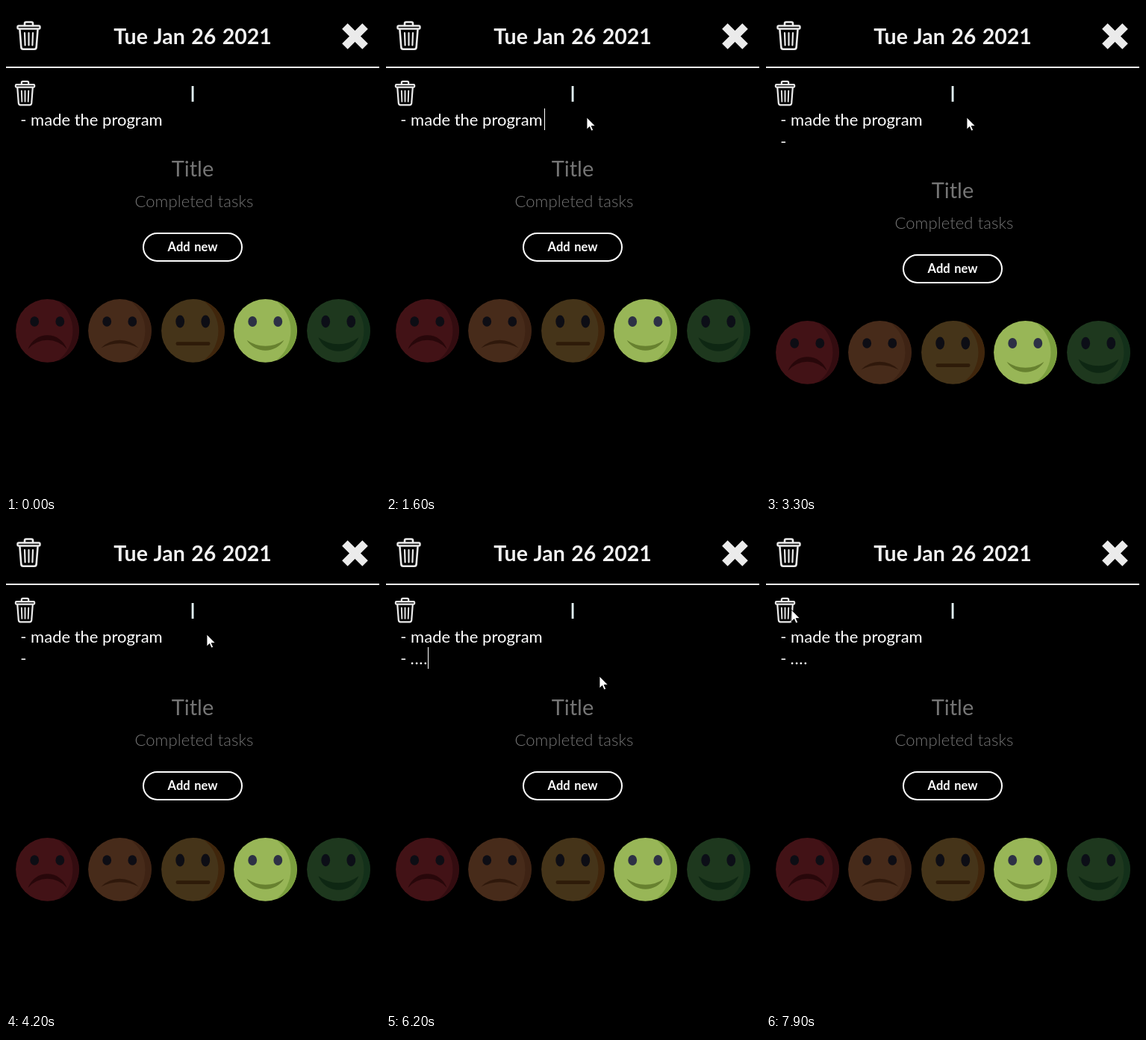
An HTML page for the animation above (8000 ms loop, 501 by 654 pixels).

```html
<!DOCTYPE html>
<html lang="en">
<head>
<meta charset="utf-8">
<title>Daily log</title>
<style>
  html, body { margin: 0; width: 100%; height: 100%; overflow: hidden; background: #000; }
  svg { display: block; width: 501px; height: 654px; }
  text { font-family: Lato, Roboto, sans-serif; fill: #fff; white-space: pre; }
  .mid { text-anchor: middle; }
  .head { font-size: 28.5px; font-weight: 700; word-spacing: 1.5px; fill: #f2f2f2; }
  .title { font-size: 29px; }
  .body { font-size: 22px; }
  .dots { letter-spacing: .7px; }
  .button { font-size: 16.5px; font-weight: 700; word-spacing: 1.5px; }
  .hint { fill: #757575; }
  .thin { font-weight: 300; letter-spacing: .1px; }
</style>
</head>
<body>
<svg viewBox="0 0 501 654">
  <defs>
    <g id="bin" fill="none" stroke="#ebebeb" stroke-width="2.6" stroke-linecap="round" stroke-linejoin="round">
      <path d="M11 6V3.5Q11 1.5 13 1.5H20Q22 1.5 22 3.5V6"/>
      <rect x="1.5" y="6.5" width="30" height="4" rx="1.5" stroke-width="2.4"/>
      <path d="M4.5 12L6.3 35Q6.6 37.7 9 37.7H24Q26.4 37.7 26.7 35L28.5 12"/>
      <path d="M11 16L11.6 32.5M16.5 16V32.5M22 16L21.4 32.5" stroke-width="2.2"/>
    </g>
  </defs>
  <rect width="501" height="654"/>
  <use href="#bin" x="14" y="20"/>
  <text class="head mid" x="250" y="50.5">Tue Jan 26 2021</text>
  <path d="M453.9 26.9L481.1 54.1M481.1 26.9L453.9 54.1" stroke="#ebebeb" stroke-width="10.6"/>
  <rect y="81" width="500" height="2" fill="#f0f0f0"/>

  <use href="#bin" transform="translate(11.5 99.5) scale(.85 .87)"/>
  <text class="title mid" x="250" y="128" style="fill:#e4fbff">I</text>
  <text class="body" x="19.3" y="160">- made the program</text>
  <text class="body" x="19.3" y="189" id="dash"></text>
  <text class="body dots" x="32.5" y="189" id="dots"></text>
  <rect id="caret" width="1" height="29" fill="#fff"/>

  <g id="form">
    <text class="title mid hint" x="250" y="228">Title</text>
    <text class="body thin mid hint" x="252" y="269">Completed tasks</text>
    <rect x="184" y="304" width="132" height="37" rx="18.5" fill="none" stroke="#fff" stroke-width="2"/>
    <text class="button mid" x="250" y="328">Add new</text>
    <g id="faces"></g>
  </g>
  <path id="pointer" d="M0 0V16L3.7 12.5 6.1 18 8.6 17 6.2 11.5H11.3Z" fill="#fff" stroke="#000" stroke-width=".8"/>
</svg>
<script>
const LOOP = 8000, TICK = 100;
const el = id => document.getElementById(id);

// crescent mouth between two arcs that share their ends
function bow(half, end, outer, inner) {
  const radius = peak => (half * half + (peak - end) ** 2) / (2 * Math.abs(peak - end));
  const sweep = outer < end ? 1 : 0;
  return `M${-half} ${end}A${radius(outer)} ${radius(outer)} 0 0 ${sweep} ${half} ${end}` +
    `A${radius(inner)} ${radius(inner)} 0 0 ${1 - sweep} ${-half} ${end}Z`;
}

const faces = [
  { x: 55.5, skin: '#421216', shade: '#330c10', eye: '#0d0d14', mouth: '#28070a', ry: 6.7, lips: bow(26, 24.5, 6, 12.5) },
  { x: 152.5, skin: '#472b1a', shade: '#3e2314', eye: '#0d0d14', mouth: '#2f180b', ry: 6.7, lips: bow(25, 23, 12.5, 17) },
  { x: 250.5, skin: '#453419', shade: '#40260c', eye: '#0d0d14', mouth: '#2e1b09', ry: 8.5,
    lips: 'M-21 15H21Q23 15 23 17.3T21 19.6H-21Q-23 19.6 -23 17.3T-21 15Z' },
  { x: 347.5, skin: '#98b657', shade: '#7b9f3e', eye: '#2d3045', mouth: '#67812f', ry: 7, lips: bow(25, 12.5, 26.5, 20.5) },
  { x: 445.5, skin: '#1e381e', shade: '#13301a', eye: '#0c0e17', mouth: '#0e2713', ry: 8.2, lips: bow(27, 9, 27.5, 18) }
];

el('faces').innerHTML = faces.map(f => `
  <g transform="translate(${f.x} 434.3)">
    <circle r="42.4" fill="${f.skin}"/>
    <path d="M14 -40A42.4 42.4 0 0 1 14 40A50 50 0 0 0 14 -40Z" fill="${f.shade}"/>
    <ellipse cx="-17.3" cy="-12.3" rx="5.9" ry="${f.ry}" fill="${f.eye}"/>
    <ellipse cx="16.8" cy="-12.3" rx="5.9" ry="${f.ry}" fill="${f.eye}"/>
    <path d="${f.lips}" fill="${f.mouth}"/>
  </g>`).join('');

// time, x, y of the pointer tip
const route = [
  [400, 451, 330], [1200, 279, 139], [1300, 273, 143], [1400, 269, 149],
  [5800, 269, 149], [6200, 286, 205], [6800, 286, 205], [7100, 231, 254],
  [7300, 190, 215], [7500, 190, 215], [7900, 34, 116]
];
// time spans in which the caret is visible
const blinks = [[1600, 2600], [2700, 3300], [3800, 4200], [4700, 5700], [6000, 6500]];
const dotTimes = [4800, 4900, 5100, 5200];

function pointerAt(t) {
  const next = route.findIndex(p => p[0] > t);
  if (next < 0) return route[route.length - 1].slice(1);
  const a = route[Math.max(0, next - 1)], b = route[next];
  const k = Math.max(0, (t - a[0]) / (b[0] - a[0]));
  const ease = k * (2 - k);
  return [1, 2].map(i => Math.round(a[i] + (b[i] - a[i]) * ease));
}

function draw(time) {
  const t = Math.floor((time % LOOP) / TICK) * TICK;
  const secondLine = t >= 2100;
  const dots = dotTimes.filter(d => t >= d).length;

  el('form').setAttribute('transform', `translate(0 ${secondLine ? 29 : 0})`);
  el('dash').textContent = t >= 2700 ? '-' : '';
  el('dots').textContent = '.'.repeat(dots);

  const caretX = !secondLine ? 212 : t < 2700 ? 20 : t < 2800 ? 27 : 32 + dots * 6;
  el('caret').setAttribute('x', caretX);
  el('caret').setAttribute('y', secondLine ? 166 : 137);
  el('caret').style.display = blinks.some(([on, off]) => t >= on && t < off) ? '' : 'none';

  el('pointer').style.display = t >= route[0][0] ? '' : 'none';
  el('pointer').setAttribute('transform', `translate(${pointerAt(t)})`);
}

const start = performance.now();
function loop() {
  draw(performance.now() - start);
  requestAnimationFrame(loop);
}
loop();
</script>
</body>
</html>
```
